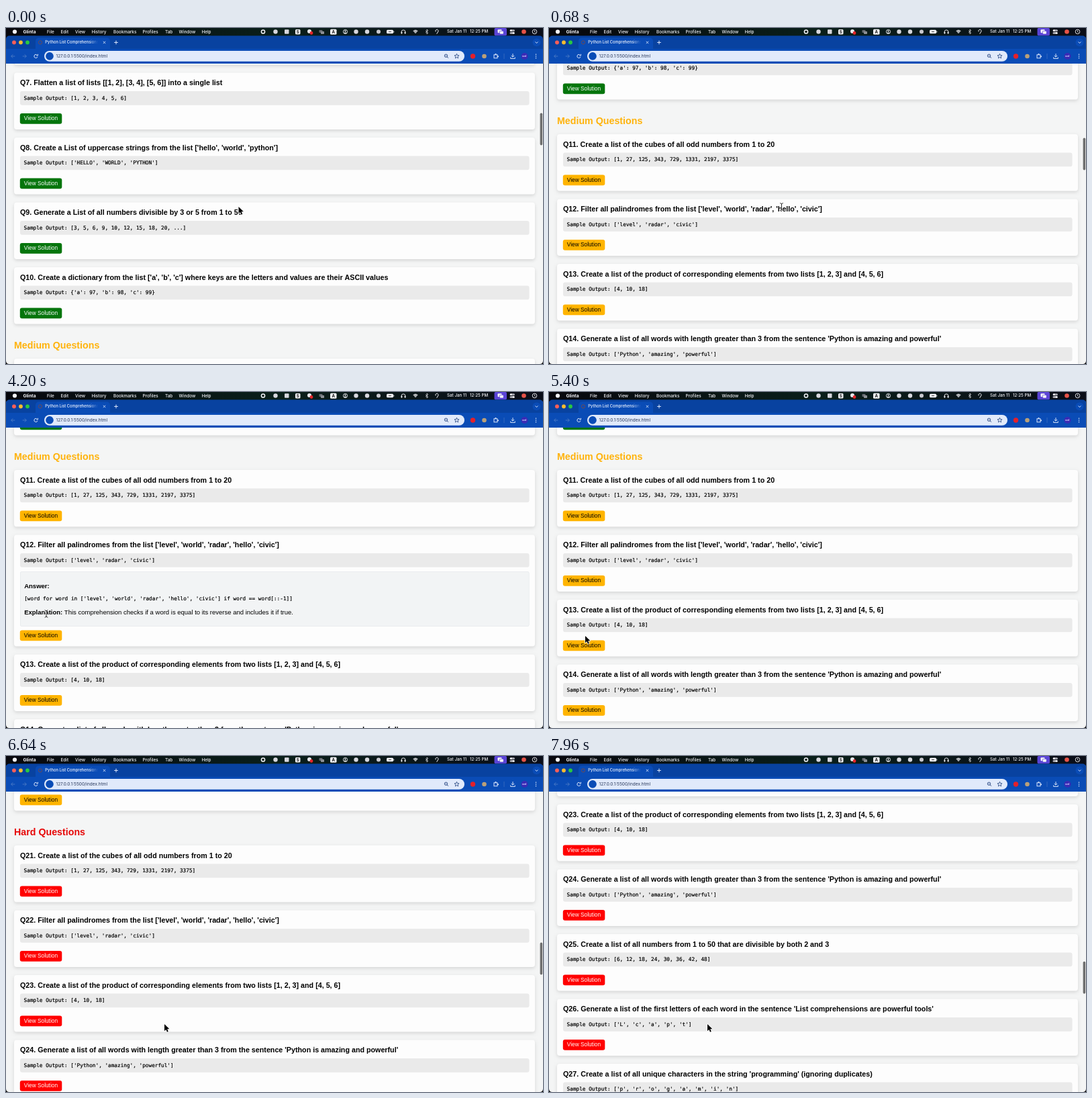
Write an HTML page with a canvas that moves like this. It is 800 px wide and 500 px high and loops after 8000 ms.

```html
<!DOCTYPE html>
<html lang="en">
<head>
<meta charset="utf-8">
<title>Python List Comprehensions</title>
<style>
html, body { margin: 0; width: 100%; height: 100%; overflow: hidden; background: #000; }
canvas { display: block; width: 800px; height: 500px; }
</style>
</head>
<body>
<canvas id="stage" width="800" height="500"></canvas>
<script>
const ctx = document.getElementById('stage').getContext('2d');
const LOOP = 8000, PITCH = 96.5, SECTION_GAP = 39.5, OPEN_HEIGHT = 81.5;
const OPEN_FROM = 2800, OPEN_TO = 5350;
const SANS = '"Liberation Sans", Arial, sans-serif';
const UI = 'Inter, sans-serif';
const TITLE = 'bold 10.72px ' + SANS;
const HEADING = 'bold 14.24px ' + SANS;
const BUTTON = '8.32px ' + SANS;
const BODY = '9.5px ' + SANS;
const CODE = '7.72px "DejaVu Sans Mono", monospace';

const easyAndFirst = [
  ['Create a list of the lengths of the words in a sentence', '[3, 5, 5, 3]'],
  ['Create a list of all vowels in a given string', "['e', 'o', 'o']"],
  ['Flatten a list of lists [[1, 2], [3, 4], [5, 6]] into a single list', '[1, 2, 3, 4, 5, 6]'],
  ["Create a List of uppercase strings from the list ['hello', 'world', 'python']", "['HELLO', 'WORLD', 'PYTHON']"],
  ['Generate a List of all numbers divisible by 3 or 5 from 1 to 50', '[3, 5, 6, 9, 10, 12, 15, 18, 20, ...]'],
  ["Create a dictionary from the list ['a', 'b', 'c'] where keys are the letters and values are their ASCII values", "{'a': 97, 'b': 98, 'c': 99}"]
];
const advanced = [
  ['Create a list of the cubes of all odd numbers from 1 to 20', '[1, 27, 125, 343, 729, 1331, 2197, 3375]'],
  ["Filter all palindromes from the list ['level', 'world', 'radar', 'hello', 'civic']", "['level', 'radar', 'civic']"],
  ['Create a list of the product of corresponding elements from two lists [1, 2, 3] and [4, 5, 6]', '[4, 10, 18]'],
  ["Generate a list of all words with length greater than 3 from the sentence 'Python is amazing and powerful'", "['Python', 'amazing', 'powerful']"],
  ['Create a list of all numbers from 1 to 50 that are divisible by both 2 and 3', '[6, 12, 18, 24, 30, 36, 42, 48]'],
  ["Generate a list of the first letters of each word in the sentence 'List comprehensions are powerful tools'", "['L', 'c', 'a', 'p', 't']"],
  ["Create a list of all unique characters in the string 'programming' (ignoring duplicates)", "['p', 'r', 'o', 'g', 'a', 'm', 'i', 'n']"],
  ['Generate a list of tuples with each number and its square from 1 to 5', '[(1, 1), (2, 4), (3, 9), (4, 16), (5, 25)]'],
  ['Create a list of all prime numbers from 1 to 20', '[2, 3, 5, 7, 11, 13, 17, 19]'],
  ['Transpose the matrix [[1, 2], [3, 4], [5, 6]]', '[[1, 3, 5], [2, 4, 6]]']
];
const questions = [...easyAndFirst, ...advanced, ...advanced]
  .map(([title, output], i) => ({ n: i + 5, title: `Q${i + 5}. ${title}`, output: 'Sample Output: ' + output }));

const levels = [
  { fill: '#05750c', ink: '#fff' },
  { fill: '#ffb400', ink: '#000', heading: 'Medium Questions', color: '#ffb30c' },
  { fill: '#ff0000', ink: '#fff', heading: 'Hard Questions', color: '#e60808' }
];
const levelOf = n => n > 20 ? 2 : n > 10 ? 1 : 0;

const clamp = v => Math.max(0, Math.min(1, v));
const smooth = v => { v = clamp(v); return v * v * (3 - 2 * v); };

function scrollAt(t) {
  if (t < 2200) return 376 * (1 - Math.exp(-Math.max(0, t - 100) / 265));
  if (t < 7000) return 376 + 989 * smooth((t - 6116) / 537);
  return 1365 + 252.5 * (1 - (1 - clamp((t - 7000) / 960)) ** 3);
}

const cursorPath = [
  [0, 346.5, 266], [1350, 346.5, 266], [1900, 127.5, 277], [2050, 127.5, 277],
  [2450, 55, 282], [3000, 55, 282], [3500, 60, 330], [4700, 60, 330],
  [5100, 54, 363], [5500, 54, 363], [5950, 236, 399], [LOOP, 236, 399]
];
function cursorAt(t) {
  const i = cursorPath.findIndex(k => k[0] > t);
  const [t0, x0, y0] = cursorPath[i - 1], [t1, x1, y1] = cursorPath[i];
  const p = smooth((t - t0) / (t1 - t0));
  return { x: x0 + (x1 - x0) * p, y: y0 + (y1 - y0) * p };
}

function text(str, x, y, font, color = '#000') {
  ctx.font = font;
  ctx.fillStyle = color;
  ctx.fillText(str, x, y);
  if (font === CODE) {
    ctx.strokeStyle = color;
    ctx.lineWidth = 0.2;
    ctx.strokeText(str, x, y);
  }
}
function box(x, y, w, h, r, color) {
  ctx.fillStyle = color;
  ctx.beginPath();
  ctx.roundRect(x, y, w, h, r);
  ctx.fill();
}
function dot(x, y, r, color) {
  ctx.fillStyle = color;
  ctx.beginPath();
  ctx.arc(x, y, r, 0, 7);
  ctx.fill();
}
function arc(x, y, r, color, width = 0.9, from = 0, to = Math.PI * 2) {
  ctx.strokeStyle = color;
  ctx.lineWidth = width;
  ctx.beginPath();
  ctx.arc(x, y, r, from, to);
  ctx.stroke();
}
function line(color, width, ...points) {
  ctx.strokeStyle = color;
  ctx.lineWidth = width;
  ctx.beginPath();
  for (let i = 0; i < points.length; i += 2) ctx.lineTo(points[i], points[i + 1]);
  ctx.stroke();
}
function across(x0, x1, ...colors) {
  const gradient = ctx.createLinearGradient(x0, 0, x1, 0);
  colors.forEach((c, i) => gradient.addColorStop(i / (colors.length - 1), c));
  return gradient;
}

// Draws one card and returns the pointer shape it asks for, if any.
function drawCard(q, top, open, cursor) {
  const level = levels[levelOf(q.n)];
  const height = 84.5 + (open ? OPEN_HEIGHT : 0);
  let pointer = null;
  const selectable = (str, x, y, font, reach) => {
    text(str, x, y, font);
    const width = ctx.measureText(str).width;
    if (cursor.x > x && cursor.x < x + width && Math.abs(cursor.y - y) < reach) pointer = 'beam';
    return width;
  };

  ctx.shadowColor = 'rgba(0,0,0,0.13)';
  ctx.shadowBlur = 5;
  ctx.shadowOffsetY = 2;
  box(12, top, 776, height, 4, '#fdfdfd');
  ctx.shadowColor = 'transparent';

  selectable(q.title, 21, top + 15.9, TITLE, 5.5);
  box(21, top + 27.6, 758.5, 20.7, 3, '#eaeaea');
  selectable(q.output, 26.6, top + 38.4, CODE, 4.5);

  if (open) {
    box(21, top + 54.5, 758.5, 82, 3, '#e3e6e9');
    box(21.6, top + 55.1, 757.3, 80.8, 2.5, '#f2f4f5');
    selectable('Answer:', 27.2, top + 76.6, 'bold ' + BODY, 5);
    selectable("[word for word in ['level', 'world', 'radar', 'hello', 'civic'] if word == word[::-1]]", 27.2, top + 95.9, CODE, 4.5);
    const w = selectable('Explanation: ', 27.2, top + 115.6, 'bold ' + BODY, 5);
    selectable('This comprehension checks if a word is equal to its reverse and includes it if true.', 27.2 + w, top + 115.6, BODY, 5);
  }

  const by = top + height - 24;
  box(20.8, by, 62.5, 15.8, 3, level.fill);
  text('View Solution', 26.8, by + 8.1, BUTTON, level.ink);
  if (cursor.x > 21 && cursor.x < 83 && cursor.y > by && cursor.y < by + 16) pointer = 'hand';
  return pointer;
}

function drawPage(t, cursor) {
  const scroll = scrollAt(t), opened = t >= OPEN_FROM && t < OPEN_TO;
  let pointer = 'arrow';
  ctx.fillStyle = '#f4f5f5';
  ctx.fillRect(0, 53, 800, 447);
  for (const q of questions) {
    const level = levelOf(q.n);
    const top = 66.5 + (q.n - 7) * PITCH + level * SECTION_GAP - scroll + (opened && q.n > 12 ? OPEN_HEIGHT : 0);
    if (top < -130 || top > 545) continue;
    if (q.n === 11 || q.n === 21) text(levels[level].heading, 12, top - 18.9, HEADING, levels[level].color);
    pointer = drawCard(q, top, opened && q.n === 12, cursor) || pointer;
  }
  const fade = t < 4000 ? 1 - clamp((t - 2150) / 250) : clamp((t - 6080) / 60);
  if (fade) box(795.6, 126.5 + scroll * 0.1108, 3.6, 48, 1.8, `rgba(110,110,110,${fade})`);
  return pointer;
}

function drawMenuBar() {
  const white = '#f4f4f8';
  ctx.fillStyle = across(0, 800, '#07070d', '#0a1f1a', '#0a0d18');
  ctx.fillRect(0, 0, 800, 14);
  dot(13, 5.5, 3.1, white);
  text('Glinta', 25.5, 5.6, `bold 6.7px ${UI}`, white);
  const menus = [['File', 61], ['Edit', 81.5], ['View', 103], ['History', 127.5], ['Bookmarks', 160],
    ['Profiles', 203.5], ['Tab', 237], ['Window', 257.5], ['Help', 291.5]];
  for (const [label, x] of menus) text(label, x, 5.6, `500 6.4px ${UI}`, white);
  text('Sat Jan 11\u2002 12:25 PM', 657, 5.6, `500 6.25px ${UI}`, white);

  arc(383, 5.5, 2.6, white, 1.5);
  dot(401.5, 5.5, 3.2, '#d8d8de');
  box(415, 2.3, 6.5, 6.5, 1, '#d8d8de');
  box(431, 2, 7.5, 7.5, 1.5, white);
  text('S', 432.7, 6, `bold 6px ${UI}`, '#111');
  dot(452, 5, 3, '#e8e8ec');
  dot(455, 7.5, 2.4, '#e5262b');
  box(466.5, 3, 5, 4, 0.8, '#666a70');
  box(469, 5, 5, 4, 0.8, '#8b8e94');
  box(483, 1.8, 9.5, 8, 1.5, white);
  text('A', 485.6, 6, `bold 6px ${UI}`, '#111');
  arc(505.5, 5.5, 3.1, white);
  dot(505.5, 4.6, 1.1, white);
  line(white, 1.2, 503.6, 7.3, 507.4, 7.3);
  dot(521.5, 5.5, 3.2, '#d8d8de');
  dot(538, 5.5, 3.2, '#d8d8de');
  dot(555, 5.5, 3, '#c9c9cf');
  box(567, 2.8, 10, 5.5, 1.5, white);
  box(577.4, 4.4, 0.9, 2.3, 0.4, white);
  line('#111', 0.8, 570, 5.6, 574, 5.6);
  arc(592, 5.8, 2.9, white, 0.9, Math.PI, 0);
  box(588.5, 5.5, 1.8, 3.3, 0.8, white);
  box(593.7, 5.5, 1.8, 3.3, 0.8, white);
  for (const r of [1.5, 3.2, 4.9]) arc(610, 8.5, r, white, 1.1, -2.3, -0.84);
  line(white, 0.7, 625, 3.8, 628.8, 7.4, 627, 9, 627, 2, 628.8, 3.7, 625, 7.2);
  arc(642, 4.4, 2.1, white, 1, 2.6, 7.2);
  line(white, 1, 643.4, 6, 641.6, 8.8);

  box(727.5, 0, 18.5, 11.5, 2, '#5b45d6');
  box(732.5, 2.2, 6, 5, 1, white);
  box(735, 4.2, 6.5, 5, 1, '#5b45d6');
  box(735.7, 4.8, 5.2, 4, 0.8, white);
  for (const [y, knob] of [[3.7, 752.3], [7.5, 756]]) {
    box(750.5, y - 1.5, 7.5, 3, 1.5, '#a9a9b1');
    dot(knob, y, 1.2, '#fff');
  }
  dot(771.5, 5.5, 3.3, '#e65348');
  arc(787.5, 5.5, 3.3, white, 0.9);
  line(white, 0.8, 787.5, 3.5, 787.5, 5.7, 788.8, 6.5);
}

function drawBrowser() {
  const strip = '#0842a0', bar = '#0a4cb6', pale = '#dbe6fb', ink = '#1f3f7c';
  box(0, 11.6, 800, 22, [5, 5, 0, 0], strip);
  ctx.fillStyle = bar;
  ctx.fillRect(0, 31, 800, 22);
  box(44, 14.5, 111, 17, [5, 5, 0, 0], bar);
  ['#ff5f57', '#febc2e', '#28c840'].forEach((c, i) => dot(12 + i * 10, 21.5, 2.9, c));
  arc(51, 21.5, 2.6, '#6f4a50', 1);

  const faded = across(124, 137, '#f2f6ff', 'rgba(242,246,255,0)');
  text('Python List Comprehensions', 58.3, 21.6, `500 5.8px ${UI}`, faded);
  line(pale, 0.9, 144.8, 19.8, 148.2, 23.2);
  line(pale, 0.9, 148.2, 19.8, 144.8, 23.2);
  line(pale, 1, 161.2, 21.5, 166.8, 21.5);
  line(pale, 1, 164, 18.7, 164, 24.3);
  dot(790.5, 21.5, 6, bar);
  line(pale, 1, 788.5, 20.6, 790.5, 22.6, 792.5, 20.6);

  for (const [x, s] of [[10.5, 1], [27.5, -1]]) {
    line('#4d7cc6', 0.9, x - 2.8, 42, x + 2.8, 42);
    line('#4d7cc6', 0.9, x - s * 0.3, 39.4, x - s * 2.8, 42, x - s * 0.3, 44.6);
  }
  arc(44.5, 42, 2.6, pale, 1, 0.3, 5.4);
  line(pale, 1, 47.4, 38.8, 47.4, 41, 45.2, 41);

  box(57, 34, 626, 15.8, 7.9, '#e1eafb');
  dot(65, 41.9, 5.8, bar);
  text('127.0.0.1:5500/index.html', 74.5, 42, `6.5px ${UI}`, '#26365a');
  arc(655.5, 41.3, 2.2, ink, 0.9);
  line(ink, 0.9, 657.1, 42.9, 659, 44.8);
  line(ink, 0.6, 654.4, 41.3, 656.6, 41.3);
  ctx.beginPath();
  for (let i = 0; i < 10; i++) {
    const r = i % 2 ? 1.6 : 3.7, a = i * Math.PI / 5 - Math.PI / 2;
    ctx.lineTo(671.5 + r * Math.cos(a), 42 + r * Math.sin(a));
  }
  ctx.closePath();
  ctx.strokeStyle = ink;
  ctx.lineWidth = 0.8;
  ctx.stroke();

  dot(695.5, 42, 3.7, '#e3202b');
  dot(712.5, 42, 3.3, '#b9a079');
  ctx.strokeStyle = pale;
  ctx.lineWidth = 1;
  ctx.strokeRect(727, 39.8, 5, 5);
  dot(729.5, 39, 1.1, pale);
  dot(733, 42.3, 1.1, pale);
  line('#3d6fc0', 0.8, 742, 38, 742, 46);
  line(pale, 1, 755, 38.2, 755, 43);
  line(pale, 1, 752.8, 41, 755, 43.2, 757.2, 41);
  line(pale, 1, 751.7, 43.5, 751.7, 45.4, 758.3, 45.4, 758.3, 43.5);
  dot(772.5, 42, 5, '#3a2bb5');
  text('svd', 769, 42, `bold 3.6px ${UI}`, '#d9d4ff');
  for (const y of [39.2, 42, 44.8]) dot(789.5, y, 0.8, pale);
}

function drawCursor({ x, y }, kind) {
  ctx.save();
  ctx.translate(x, y);
  ctx.lineJoin = 'round';
  if (kind === 'beam') {
    for (const [color, w] of [['rgba(255,255,255,.8)', 2], ['#111', 0.9]]) {
      line(color, w, 0, -4.5, 0, 4.5);
      line(color, w, -2.3, -5.5, 0, -4.3, 2.3, -5.5);
      line(color, w, -2.3, 5.5, 0, 4.3, 2.3, 5.5);
    }
  } else {
    const shape = kind === 'hand'
      ? 'M-1 0Q0-1 1 0V4L5 5Q6 5 6 7L5 11H-1L-4 7Q-4 5-2 6L-1 7Z'
      : 'M0 0V10.2L2.4 8L4 11.8L5.8 11L4.2 7.3H7.4Z';
    const path = new Path2D(shape);
    ctx.strokeStyle = '#fff';
    ctx.lineWidth = 1.5;
    ctx.stroke(path);
    ctx.fillStyle = '#000';
    ctx.fill(path);
  }
  ctx.restore();
}

function drawCorners() {
  ctx.fillStyle = '#000';
  for (const [x, s] of [[0, 1], [800, -1]]) {
    ctx.beginPath();
    ctx.moveTo(x, 495);
    ctx.quadraticCurveTo(x, 500, x + 5 * s, 500);
    ctx.lineTo(x, 500);
    ctx.fill();
  }
}

function frame(now) {
  const t = now % LOOP, cursor = cursorAt(t);
  ctx.textBaseline = 'middle';
  const pointer = drawPage(t, cursor);
  drawMenuBar();
  drawBrowser();
  drawCorners();
  drawCursor(cursor, pointer);
  requestAnimationFrame(frame);
}
requestAnimationFrame(frame);
</script>
</body>
</html>
```
